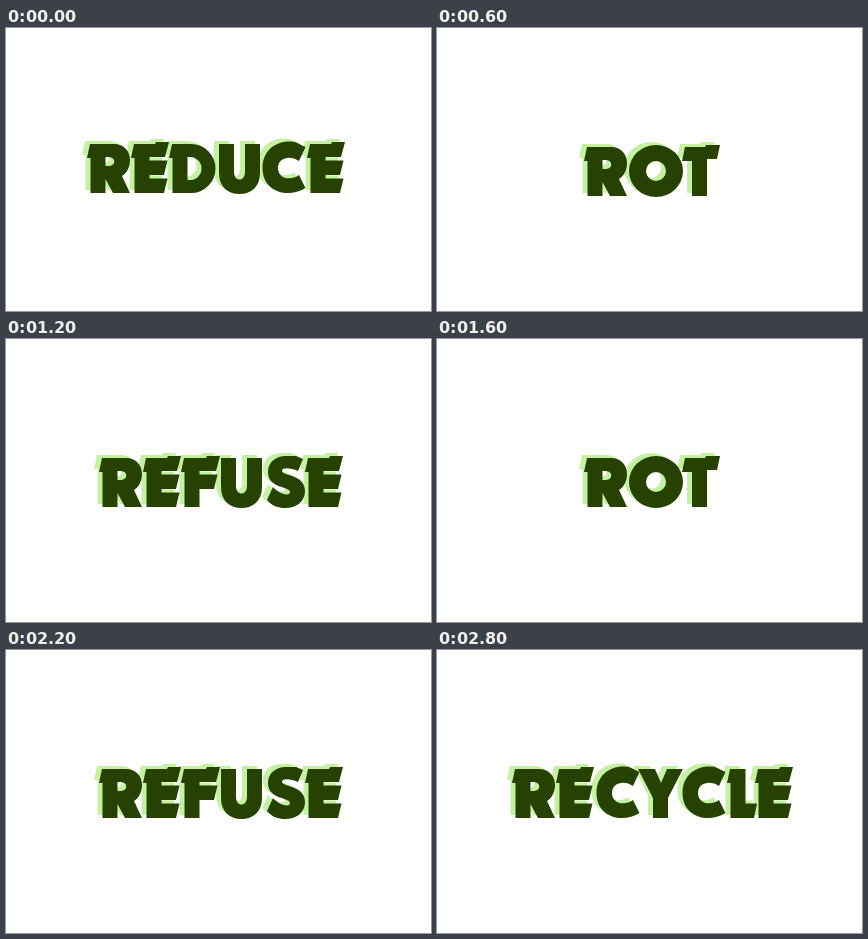
An HTML page that plays this animation: 425x283 px, repeating every 3 s.

```html
<!DOCTYPE html>
<html lang="en">
<head>
<meta charset="utf-8">
<title>Five Rs</title>
<style>
html, body { margin: 0; width: 100%; height: 100%; overflow: hidden; background: #fff; }
svg { display: block; width: 425px; height: 283px; }
</style>
</head>
<body>
<svg viewBox="0 0 425 283" role="img">
  <g id="word"></g>
  <use href="#word" fill="#264102"/>
</svg>
<script>
// Display lettering: [advance, outline], relative to the baseline.
const GLYPHS = {
  R: [44, 'M0-35L3-49H27C37-49 43-42 43-33C43-26 40-20 35-17L43 0H26L18.5-14V0H3.5V-35ZM18.5-36V-27H22C29-27 29-36 22-36Z'],
  E: [38, 'M0-35L3-49H24L25-51H38L34-36H18.5V-32.5H36.5L33-18H18.5V-14.5H36.5L33 0H3.5V-35Z'],
  F: [37, 'M0-35L3-49H25L26-51H39L35-36H18.5V-32.5H36.5L33-18H18.5V0H3.5V-35Z'],
  D: [47, 'M0-35L3-49H22A24.5 24.5 0 0 1 22 0H3.5V-35ZM18.5-36V-13H21A11.5 11.5 0 0 0 21-36Z'],
  U: [44, 'M3-49H18V-21C18-11 29-11 29-21V-49H44V-20C44-6 35 1 23.5 1C12 1 3-6 3-20Z'],
  C: [47, 'M45.5-46L39-32C31-38 18-36 18-25S31-12 39-18L45.5-5C28 6 2.5-1 2.5-25C2.5-43 17-54 35-51Z'],
  S: [43, 'M41-48L36-36C29-39 20-40 20-36C20-31 43-33 43-16C43-5 34 1 23 1C16 1 10-1 5-7L11-20C17-13 28-10 28-15C28-21 6-18 6-35C6-45 14-51 24-51H34Z'],
  O: [54, 'M1-25A27 26 0 0 1 55-25A27 26 0 0 1 1-25ZM18-25A10 10 0 0 0 38-25A10 10 0 0 0 18-25Z'],
  T: [38, 'M0-35L3-49H23L24-51H38L35-37H25V0H10V-35Z'],
  Y: [39, 'M-3-49H14L20-35L26-49H42L27-20V0H12V-20Z'],
  L: [28, 'M0-35L3-49H18.5V-14.5H30L27 0H3.5V-35Z']
};
// [text, left edge, baseline]
const WORDS = [
  ['REDUCE', 81, 165],
  ['REFUSE', 93, 168],
  ['REUSE', 112, 168],
  ['ROT', 147, 168],
  ['RECYCLE', 75, 168]
];
const WORD_MS = 200;
const SHADOW = { dx: -5, dy: -3, color: '#c4f2a0' };
const FACE = { dx: 0, dy: 0, color: '#264102' };

function drawWord([text, x, y], { dx, dy, color }) {
  const letters = [...text].map(letter => {
    const [advance, outline] = GLYPHS[letter];
    const path = `<path transform="translate(${x} ${y})" d="${outline}"/>`;
    x += advance;
    return path;
  });
  return `<g fill="${color}" transform="translate(${dx} ${dy})">${letters.join('')}</g>`;
}

const svg = document.querySelector('svg');
const start = performance.now();
let shown = -1;

function draw(now) {
  const index = Math.floor(Math.max(0, now - start) / WORD_MS) % WORDS.length;
  if (index !== shown) {
    shown = index;
    const word = WORDS[index];
    svg.setAttribute('aria-label', word[0]);
    svg.innerHTML = drawWord(word, SHADOW) + drawWord(word, FACE);
  }
  requestAnimationFrame(draw);
}
draw(start);
</script>
</body>
</html>
```
